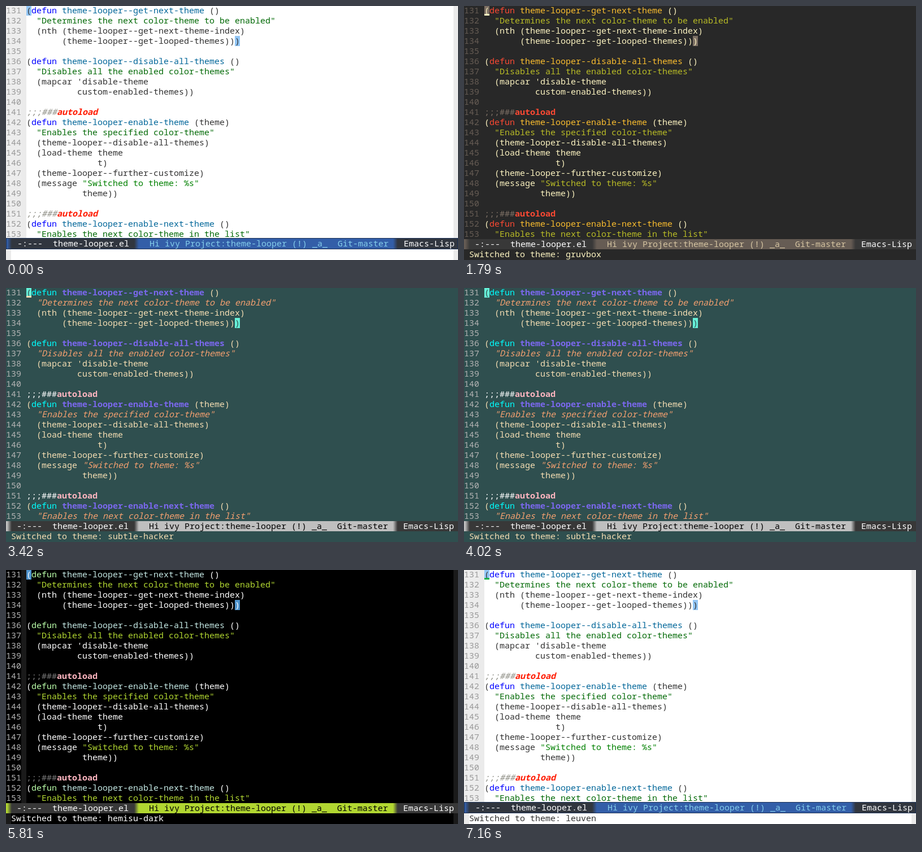
An HTML page that plays this animation: 800x450 px, repeating every 7260 ms.

```html
<!DOCTYPE html>
<html lang="en">
<head>
<meta charset="utf-8">
<title>Theme looper</title>
<style>
html, body { margin: 0; width: 100%; height: 100%; overflow: hidden; }
svg { display: block; width: 800px; height: 450px; background: var(--bg); }
text { font: 15px "Noto Sans Mono", "DejaVu Sans Mono", monospace; font-weight: var(--weight); white-space: pre; fill: var(--fg); font-variant-ligatures: none; }
.num { fill: var(--num); }
.kw { fill: var(--kw); }
.fn { fill: var(--fn); font-weight: var(--fnWeight); }
.str { fill: var(--str); font-style: var(--strStyle); }
.doc { fill: var(--doc); font-style: var(--strStyle); }
.com { fill: var(--com); font-style: var(--comStyle); }
.warn { fill: var(--warn); font-weight: var(--warnWeight); font-style: var(--comStyle); }
.hit { fill: var(--hit); }
.hitText { fill: var(--hitText); }
.cursor { fill: var(--cursor); }
.fringe { fill: var(--fringe); }
.margin { fill: var(--margin); }
.side { fill: var(--side); }
.mid { fill: var(--mid); }
.edge { fill: none; stroke: var(--edge); }
text.sideText { fill: #fff; }
text.midText { fill: var(--midText); }
.midStop { stop-color: var(--mid); }
.sideStop { stop-color: var(--side); }
</style>
</head>
<body>
<svg id="stage" viewBox="0 0 800 450">
  <defs>
    <linearGradient id="toSide"><stop class="midStop"/><stop class="sideStop" offset="1"/></linearGradient>
    <linearGradient id="toMid"><stop class="sideStop"/><stop class="midStop" offset="1"/></linearGradient>
  </defs>
</svg>
<script>
const CELL = 9, ROW = 18, FIRST_LINE = 131, LOOP = 7260;
const stage = document.getElementById("stage");

const code = `(defun theme-looper--get-next-theme ()
  "Determines the next color-theme to be enabled"
  (nth (theme-looper--get-next-theme-index)
       (theme-looper--get-looped-themes)))

(defun theme-looper--disable-all-themes ()
  "Disables all the enabled color-themes"
  (mapcar 'disable-theme
          custom-enabled-themes))

;;;###autoload
(defun theme-looper-enable-theme (theme)
  "Enables the specified color-theme"
  (theme-looper--disable-all-themes)
  (load-theme theme
              t)
  (theme-looper--further-customize)
  (message "Switched to theme: %s"
           theme))

;;;###autoload
(defun theme-looper-enable-next-theme ()
  "Enables the next color-theme in the list"`.split("\n");

const base = {
  weight: 500, fnWeight: 500, warnWeight: 700, strStyle: "normal", comStyle: "normal",
  fringe: "transparent", margin: "transparent", side: "#383838", edge: "transparent"
};

const themes = {
  leuven: {
    bg: "#ffffff", fg: "#333333", num: "#9a9a9a", kw: "#0000ff", fn: "#006699",
    str: "#008000", doc: "#036a07", com: "#8d8d84", warn: "#ff1a00",
    hit: "#92c6f5", hitText: "#333333", cursor: "#19b24b",
    mid: "#335ea8", midText: "#85ceeb", side: "#31363f", edge: "#1a2f54",
    fringe: "#ebebeb", margin: "#ededed", comStyle: "italic", weight: 400, fnWeight: 400
  },
  material: {
    bg: "#263238", fg: "#ffffff", num: "#b0bec5", kw: "#fff59d", fn: "#84ffff",
    str: "#9ccc65", doc: "#ffe0b2", com: "#b0bec5", warn: "#f36c60",
    hit: "#6ec6f5", hitText: "#263238", cursor: "#ff9800",
    mid: "#1c1f26", midText: "#ffffff"
  },
  gruvbox: {
    bg: "#282828", fg: "#fdf4c1", num: "#665c54", kw: "#fb4933", fn: "#fabd2f",
    str: "#b8bb26", doc: "#b8bb26", com: "#7c6f64", warn: "#fb4933",
    hit: "#7c6f64", hitText: "#fdf4c1", cursor: "#fdf4c1",
    mid: "#665c54", midText: "#d5c4a1"
  },
  "subtle-hacker": {
    bg: "#2f4f4f", fg: "#f5deb3", num: "#b3b3b3", kw: "#00ffff", fn: "#7b68ee",
    str: "#f4a070", doc: "#f4a070", com: "#ffffff", warn: "#ffb6c1",
    hit: "#66f0d8", hitText: "#2f4f4f", cursor: "#f5deb3",
    mid: "#bfbfbf", midText: "#000000", strStyle: "italic", fnWeight: 700
  },
  "green-phosphor": {
    bg: "#001000", fg: "#32cd32", num: "#b3b3b3", kw: "#ffff00", fn: "#7fff00",
    str: "#98fb98", doc: "#556b2f", com: "#556b2f", warn: "#ff2000",
    hit: "#00ff00", hitText: "#001000", cursor: "#ff0000",
    mid: "#00ff00", midText: "#000000", warnWeight: 500
  },
  "hemisu-dark": {
    bg: "#000000", fg: "#ffffff", num: "#b3b3b3", kw: "#bbffaa", fn: "#c4e8e4",
    str: "#b1d631", doc: "#b1d631", com: "#777777", warn: "#ffb6c1",
    hit: "#4f94cd", hitText: "#ffffff", cursor: "#ffffff",
    mid: "#b1d631", midText: "#000000", fringe: "#1a1a1a"
  }
};

// [start in ms, theme, cursor shown]
const steps = [
  [0, "leuven", false], [450, "leuven", true],
  [890, "material", true], [1490, "material", false],
  [1790, "gruvbox", true], [2230, "gruvbox", false],
  [2680, "gruvbox", true], [3130, "gruvbox", false],
  [3420, "subtle-hacker", true], [4020, "subtle-hacker", false],
  [4470, "green-phosphor", true], [4920, "green-phosphor", false],
  [5210, "hemisu-dark", true], [5810, "hemisu-dark", false],
  [6260, "leuven", true], [6710, "leuven", false], [7160, "leuven", true]
];

function add(tag, attrs, parent = stage) {
  const el = document.createElementNS("http://www.w3.org/2000/svg", tag);
  for (const key in attrs) el.setAttribute(key, attrs[key]);
  return parent.appendChild(el);
}
const rect = (cls, x, y, width, height, parent) =>
  add("rect", { class: cls, x, y, width, height }, parent);
function label(cls, x, y, str, parent) {
  const el = add("text", { class: cls, x, y }, parent);
  el.textContent = str;
  return el;
}

// Splits one line of Lisp into [class, text] pieces.
function tokens(line) {
  if (line.startsWith(";")) return [["com", ";;;###"], ["warn", "autoload"]];
  const def = line.match(/^(\()(defun)( )(\S+)(.*)$/);
  if (def) return ["", "kw", "", "fn", ""].map((cls, i) => [cls, def[i + 1]]);
  const quote = line.indexOf('"');
  if (quote < 0) return [["", line]];
  const head = line.slice(0, quote);
  return [["", head], [head.trim() ? "str" : "doc", line.slice(quote)]];
}

rect("margin", 0, 0, 27, 413);
rect("fringe", 27, 0, 9, 413);
rect("fringe", 792, 0, 8, 413);
rect("fringe", 0, 431, 9, 19);
rect("fringe", 792, 431, 8, 19);

code.forEach((line, row) => {
  const y = row * ROW + 13;
  label("num", 0, y, FIRST_LINE + row);
  let col = 4;
  for (const [cls, str] of tokens(line)) {
    if (str.trim()) label(cls, col * CELL, y, str);
    col += str.length;
  }
});

function match(col, row, paren) {
  rect("hit", col * CELL, row * ROW - 1, CELL, ROW);
  label("hitText", col * CELL, row * ROW + 13, paren);
}
match(4, 0, "(");
match(45, 3, ")");
const cursor = rect("cursor", 36, 14, 9, 3);

const bar = add("g", {});
const barBack = rect("side", 0, 413, 800, 18, bar);
const barParts = [
  rect("mid", 0, 413, 2, 18, bar),
  rect("", 2, 413, 8, 18, bar),
  rect("", 227, 413, 8, 18, bar),
  rect("mid", 235, 413, 450, 18, bar),
  rect("", 685, 413, 8, 18, bar)
];
[[1, "toSide"], [2, "toMid"], [4, "toSide"]].forEach(([i, id]) =>
  barParts[i].setAttribute("fill", `url(#${id})`));
const edge = rect("edge", 0.5, 411.5, 799, 19, bar);
const barText = add("g", {}, bar);
label("sideText", 19, 427, "-:---  theme-looper.el", barText);
label("midText", 253, 427, "Hi ivy Project:theme-looper (!) _a_  Git-master", barText);
label("sideText", 703, 427, "Emacs-Lisp", barText);
const echo = label("", 9, 445, "");

function setTheme(name) {
  const theme = { ...base, ...themes[name] };
  for (const key in theme) stage.style.setProperty("--" + key, theme[key]);
  const boxed = name === "leuven";
  for (const part of [barBack, ...barParts]) {
    part.setAttribute("y", boxed ? 411 : 413);
    part.setAttribute("height", boxed ? 20 : 18);
  }
  edge.style.display = boxed ? "" : "none";
  barText.setAttribute("transform", boxed ? "translate(1 -1)" : "translate(0 0)");
}

let shown = -1;
function draw() {
  const t = performance.now() % LOOP;
  const now = steps.findLastIndex(step => step[0] <= t);
  if (now !== shown) {
    const [start, name, blink] = steps[now];
    setTheme(name);
    cursor.style.display = blink ? "" : "none";
    echo.textContent = start < 890 ? "" : "Switched to theme: " + name;
    shown = now;
  }
  requestAnimationFrame(draw);
}
draw();
</script>
</body>
</html>
```
